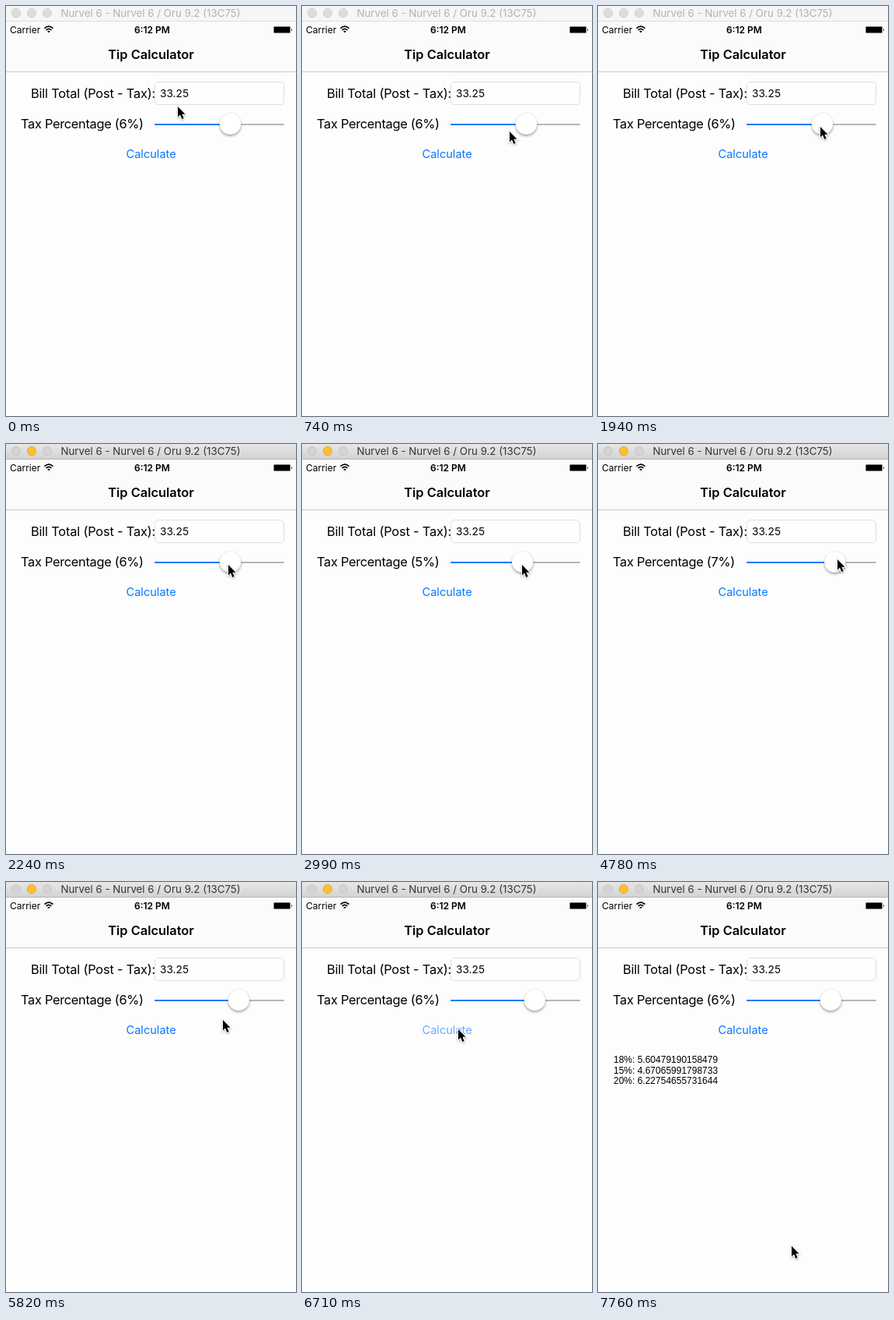
Recreate the animation shown at these times as an HTML page. Size 373 by 526 pixels, loop 8 s.

```html
<!DOCTYPE html>
<html lang="en">
<head>
<meta charset="utf-8">
<title>Tip Calculator</title>
<style>
html, body { margin: 0; width: 100%; height: 100%; overflow: hidden; background: #fdfdfd; }
svg { display: block; width: 373px; height: 526px; }
text { font-family: Inter, Roboto, sans-serif; white-space: pre; }
.window { font-size: 13.3px; text-anchor: middle; fill: #343434; }
.status { font-size: 12px; }
.heading { font-size: 16.4px; font-weight: 600; text-anchor: middle; }
.label { font-size: 16.4px; letter-spacing: -.2px; }
.narrow { letter-spacing: -.31px; }
.input { font-size: 13.7px; }
.button { font-size: 14.6px; fill: #007aff; }
.results { font: 12px "Liberation Sans", Arial, sans-serif; }
.knob { fill: #fff; stroke: rgba(0,0,0,.12); stroke-width: .5; filter: drop-shadow(0 2px 1.5px rgba(0,0,0,.32)); }
.cursor { stroke: #fff; stroke-width: 2; paint-order: stroke; filter: drop-shadow(0 1px 1px rgba(0,0,0,.3)); }
.light { fill: #d3d3d3; stroke: #c2c2c2; stroke-width: .8; }
.yellow { fill: #fdbe2f; stroke: #e2a52a; }
.idle .bar { fill: #f6f6f6; }
.idle .window { fill: #b3b3b3; }
.idle .edge { stroke: #dcdcdc; }
.idle .light { fill: #dcdcdc; stroke: #cfcfcf; }
</style>
</head>
<body>
<svg viewBox="0 0 373 526">
  <defs>
    <linearGradient id="chrome" x2="0" y2="1">
      <stop stop-color="#e7e7e7"/><stop offset="1" stop-color="#d2d2d2"/>
    </linearGradient>
  </defs>
  <rect width="373" height="526" fill="#fdfdfd"/>
  <g id="titlebar">
    <rect class="bar" width="373" height="20" fill="url(#chrome)"/>
    <path class="edge" d="M0 19.5H373" stroke="#b5b5b5"/>
    <circle class="light" cx="13" cy="9" r="5.7"/>
    <circle class="light yellow" cx="33" cy="9" r="5.7"/>
    <circle class="light" cx="53" cy="9" r="5.7"/>
    <text class="window" x="186" y="14">Nurvel 6 - Nurvel 6 / Oru 9.2 (13C75)</text>
  </g>

  <rect y="20" width="373" height="64" fill="#fbfbfb"/>
  <path d="M0 84.5H373" stroke="#c9c9c9"/>
  <text class="status" x="5" y="34.5">Carrier</text>
  <g fill="none" stroke="#000" stroke-width="1.7">
    <path d="M49.5 28.7Q55 23.6 60.5 28.7M51.6 30.9Q55 27.7 58.4 30.9"/>
    <path d="M55 34.2L53.2 32.4Q55 31 56.8 32.4Z" fill="#000" stroke="none"/>
  </g>
  <text class="status" x="188" y="34.5" font-weight="600" text-anchor="middle">6:12 PM</text>
  <rect x="344.5" y="26.5" width="21" height="8" rx="1" stroke="#777"/>
  <path d="M367 29Q369 30.5 367 32Z"/>
  <text class="heading" x="186.5" y="68">Tip Calculator</text>

  <text class="label" x="32" y="117.5">Bill Total (Post - Tax):</text>
  <rect x="191.5" y="97.5" width="166" height="29" rx="4.5" fill="#fefefe" stroke="#dedede"/>
  <text class="input" x="198" y="117">33.25</text>
  <text class="label narrow" x="19" y="156.5">Tax Percentage (<tspan id="percent">6</tspan>%)</text>
  <rect x="191" y="151" width="167" height="2" rx="1" fill="#b7b7b7"/>
  <rect id="fill" x="191" y="151" width="97" height="2" rx="1" fill="#007aff"/>
  <circle id="knob" class="knob" cy="151.3" r="13.8"/>
  <text id="button" class="button" x="154.5" y="194.5">Calculate</text>
  <g id="results">
    <text class="results" x="20" y="232">18%: 5.60479190158479</text>
    <text class="results" x="20" y="245.5">15%: 4.67065991798733</text>
    <text class="results" x="20" y="259">20%: 6.22754655731644</text>
  </g>
  <path id="cursor" class="cursor" d="M0 0V13.4L3 10.6L5.3 16L7.7 15L5.4 9.7H9.5Z"/>
</svg>
<script>
const LOOP = 8000, TICK = 149.2, TICK_LEAD = 10;
const FOCUS = 15, SHOW_RESULTS = 47;
const TRACK_LEFT = 191, KNOB_ZERO = 205, KNOB_STEP = 13.9;

const move = (from, to, ...target) => ({ from, to, target });

// Glides linearly from one target to the next, resting in between.
function glide(origin, moves, tick) {
  return moves.reduce((value, { from, to, target }) => {
    const part = Math.min(1, Math.max(0, (tick - from) / (to - from)));
    return value.map((v, i) => v + (target[i] - v) * part);
  }, origin);
}

const cursorMoves = [
  move(0, 5, 267, 161),     // down to the slider
  move(5, 8, 285, 186),
  move(9, 13, 286, 155),    // onto the knob
  move(17, 21, 282, 155),   // drag left, right, back
  move(21, 29, 311, 148),
  move(31, 34, 302, 148),
  move(38, 39, 279, 177),   // to the button
  move(39, 40, 239, 185),
  move(41, 43, 201, 189),
  move(50, 52, 249, 467)    // away
];
const knobMoves = [move(17, 21, 282), move(21, 29, 307.5), move(31, 34, 299.4)];
const buttonMoves = [move(44, 46, .2), move(46, 48, 1)];

const [titlebar, percent, fill, knob, button, results, cursor] =
  ["titlebar", "percent", "fill", "knob", "button", "results", "cursor"]
    .map(id => document.getElementById(id));

function draw(time) {
  const tick = Math.floor((time % LOOP + TICK_LEAD) / TICK);
  const [x, y] = glide([221, 129], cursorMoves, tick).map(Math.round);
  const [thumb] = glide([288.5], knobMoves, tick);
  cursor.setAttribute("transform", `translate(${x} ${y})`);
  knob.setAttribute("cx", thumb);
  fill.setAttribute("width", thumb - TRACK_LEFT);
  percent.textContent = Math.floor((thumb - KNOB_ZERO) / KNOB_STEP);
  button.style.opacity = glide([1], buttonMoves, tick)[0];
  results.style.visibility = tick >= SHOW_RESULTS ? "visible" : "hidden";
  titlebar.classList.toggle("idle", tick < FOCUS);
}

const start = performance.now();
function animate() {
  draw(performance.now() - start);
  requestAnimationFrame(animate);
}
animate();
</script>
</body>
</html>
```
